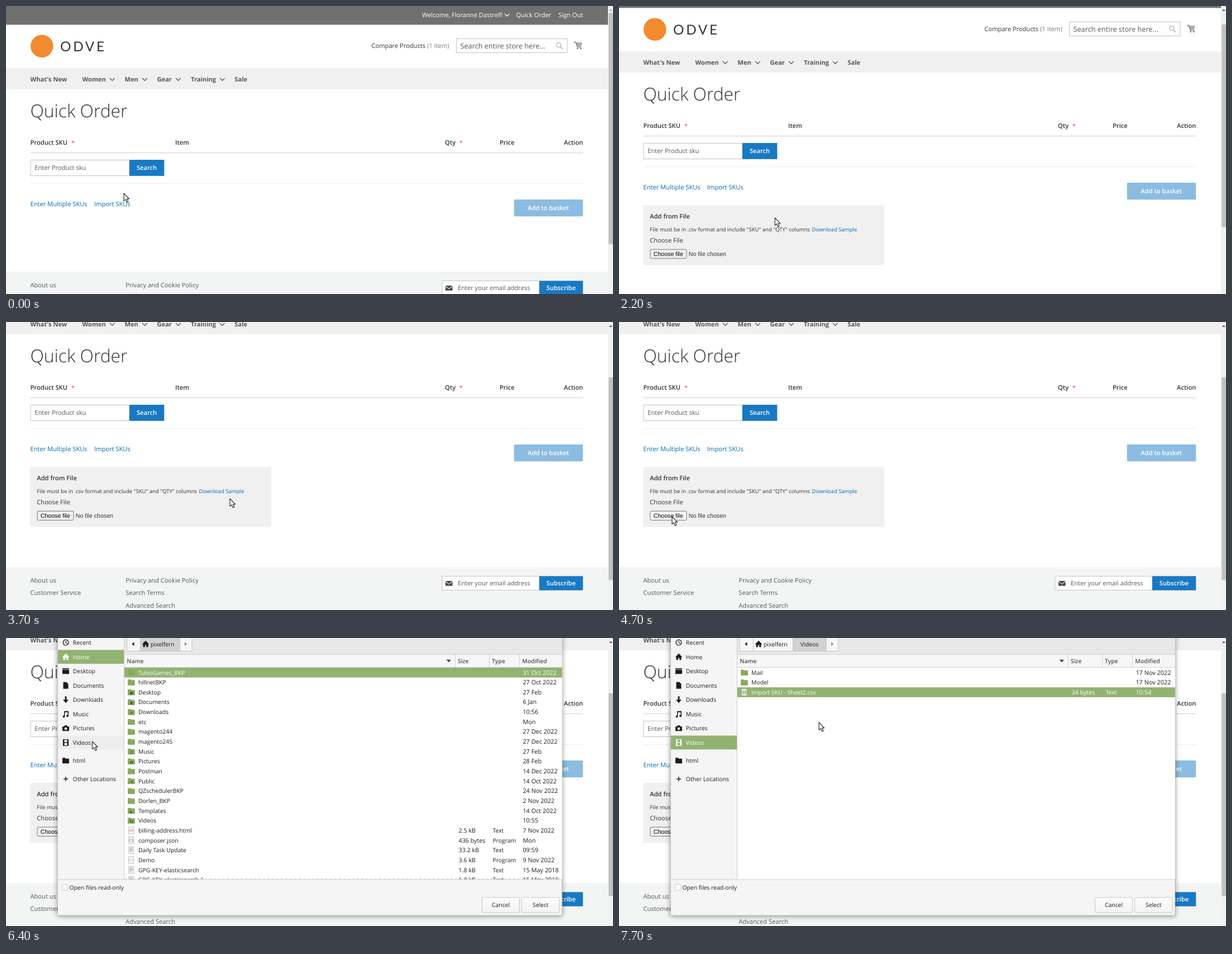
An HTML page for the animation above (8000 ms loop, 1087x515 px).

```html
<!DOCTYPE html>
<html lang="en">
<head>
<meta charset="utf-8">
<title>Quick Order</title>
<style>
html, body { margin: 0; width: 100%; height: 100%; overflow: hidden; background: #fff; }
svg { display: block; width: 100vw; height: 100vh; }
text { font-family: "Open Sans", "Noto Sans", sans-serif; text-rendering: geometricPrecision; white-space: pre; }
.sys { font-family: "Liberation Sans", Arial, sans-serif; }
.brand { font-family: Lato, sans-serif; letter-spacing: 3.7px; }
</style>
</head>
<body>
<svg id="stage" viewBox="0 0 1087 515" preserveAspectRatio="none"></svg>
<script>
const LOOP = 8000, BASE = 11.14;
const INK = '#333', GREY = '#575757', LINK = '#006bb4', BLUE = '#1979c3', GREEN = '#92b372';

const text = (x, y, s, fill = INK, o = {}) =>
  `<text x="${x}" y="${y}" fill="${fill}" font-size="${o.size || BASE}" font-weight="${o.weight || 400}"` +
  ` text-anchor="${o.anchor || 'start'}" class="${o.cls || ''}">${s}</text>`;
const rect = (x, y, w, h, fill, extra = '') =>
  `<rect x="${x}" y="${y}" width="${w}" height="${h}" fill="${fill}" ${extra}/>`;
const path = (d, fill, extra = '') => `<path d="${d}" fill="${fill}" ${extra}/>`;
const line = (d, color, w = 1, extra = '') =>
  path(d, 'none', `stroke="${color}" stroke-width="${w}" ${extra}`);
const group = (id, body, extra = '') => `<g id="${id}" ${extra}>${body}</g>`;
const at = (x, y, body, scale = 1) => `<g transform="translate(${x} ${y}) scale(${scale})">${body}</g>`;
const chevron = (x, y, color) => line(`M${x} ${y - 2}l4.3 4.3 4.3-4.3`, color, 1.3);
const semi = { weight: 600 };
const white = (x, y, s) => text(x, y, s, '#fff', { weight: 600, anchor: 'middle' });

/* ---------- shop page ---------- */
function header() {
  const cart = line('M1017 64.5h3l3.2 8.5h6.8', '#757575', 1.4) +
    line('M1021 66.2h10.5M1021.7 68.3h9.3M1022.4 70.4h8', '#757575', 1.3) +
    '<circle cx="1023.6" cy="75.8" r="1.5" fill="#757575"/><circle cx="1029.4" cy="75.8" r="1.5" fill="#757575"/>';
  return rect(0, 0, 1078, 33.5, '#6e716e') +
    text(889.5, 20, 'Welcome, Floranne Dastrell!', '#fff', { anchor: 'end' }) + chevron(893, 16, '#fff') +
    text(913.5, 20, 'Quick Order', '#fff') + text(1033.5, 20, 'Sign Out', '#fff', { anchor: 'end' }) +
    '<circle cx="64.3" cy="71.8" r="20.3" fill="#f28b2e"/>' +
    text(97, 80.5, 'ODVE', INK, { size: 24.3, cls: 'brand' }) +
    text(654.5, 75, 'Compare Products') + text(754.3, 75, '(1 item)', '#7d7d7d') +
    rect(806.5, 58.5, 198.5, 25, '#fff', 'stroke="#c2c2c2"') +
    text(813.5, 75.6, 'Search entire store here...', GREY, { size: 12.73 }) +
    '<circle cx="989.8" cy="69.8" r="4" fill="none" stroke="#b5b5b5" stroke-width="1.4"/>' +
    line('M992.8 72.8l4 4', '#b5b5b5', 1.8) + cart;
}

function nav() {
  const items = [["What's New", 43.5], ['Women', 136.5, 186], ['Men', 212.5, 244.2],
    ['Gear', 270.5, 304.2], ['Training', 331, 383], ['Sale', 409.3]];
  return rect(0, 111.5, 1078, 37.5, '#f0f0f0') + items.map(([s, x, c]) =>
    text(x, 135, s, GREY, { weight: 700 }) + (c ? chevron(c, 131, GREY) : '')).join('');
}

function order() {
  const star = x => text(x, 248, '*', '#e02b27', { size: 10 });
  return text(43.5, 198.6, 'Quick Order', INK, { size: 31.83, weight: 300 }) +
    text(43.5, 248, 'Product SKU', INK, semi) + star(117.3) + text(303, 248, 'Item', INK, semi) +
    text(786, 248, 'Qty', INK, semi) + star(812) + text(884, 248, 'Price', INK, semi) +
    text(1033.3, 248, 'Action', INK, { weight: 600, anchor: 'end' }) +
    line('M43.5 262.5H1033.5', '#d0d0d0') + line('M43.5 317.5H1033.5', '#ececec') +
    rect(44, 275.5, 177, 28, '#fff', 'stroke="#c2c2c2"') + text(51.3, 293.2, 'Enter Product sku', GREY) +
    rect(221, 275, 62.3, 28.8, BLUE) + white(252, 293.2, 'Search') +
    text(43.5, 358, 'Enter Multiple SKUs', LINK) + text(158, 358, 'Import SKUs', LINK) +
    group('under', line('M158 359.7H223', LINK)) +
    rect(909.7, 346, 123.5, 30.2, '#8cbce1', 'rx="2"') + white(971.3, 365, 'Add to basket');
}

const panel = () => rect(43.5, 386, 431.5, 107.5, '#f0f0f0', 'rx="3"') +
  text(55.3, 409.8, 'Add from File', INK, semi) +
  text(55.3, 432.7, 'File must be in .csv format and include "SKU" and "QTY" columns', INK, { size: 9.55 }) +
  text(345.6, 432.7, 'Download Sample', LINK, { size: 9.55 }) +
  text(55.3, 453, 'Choose File') +
  rect(56, 465.2, 65, 16.2, '#efefef', 'id="pick" rx="2" stroke="#767676"') +
  text(61.8, 477, 'Choose file', '#000', { size: 10.6, cls: 'sys' }) +
  text(124.8, 477, 'No file chosen', INK, { size: 10.6, cls: 'sys' });

const footer = () => rect(0, 0, 1078, 400, '#f3f4f4') +
  ['About us', 'Customer Service'].map((s, i) => text(43.5, 28 + i * 22.3, s, GREY)).join('') +
  ['Privacy and Cookie Policy', 'Search Terms', 'Advanced Search']
    .map((s, i) => text(214.3, 28 + i * 22.3, s, GREY)).join('') +
  rect(781, 16.5, 174, 25, '#fff', 'stroke="#c2c2c2"') +
  path('M787 25h12.6l-6.3 5.2zM787 26.6l6.3 5 6.3-5v7.2H787z', '#474747') +
  text(809, 33, 'Enter your email address', GREY) +
  rect(955, 16.4, 78.2, 25.4, BLUE) + white(994, 33, 'Subscribe');

/* ---------- file dialog ---------- */
const D = 10.4, DARK = '#1c1c1c';
const icon = {
  recent: 'M0-5.5a5.5 5.5 0 1 0 .01 0ZM0-4.2a4.2 4.2 0 1 1-.01 0ZM-.6-3H.6V-.2L3 1.4 2.3 2.3-.6.5Z',
  home: 'M-6.5.5L0-6 6.5.5H4.5V5.5H1.2V2H-1.2V5.5H-4.5V.5Z',
  desk: 'M-6-5H6V-3H-6ZM-6-2.2H6V5H-6Z',
  doc: 'M-4.5-6H1L4.5-2.5V6H-4.5Z',
  down: 'M-1.4-6H1.4V0H5L0 6-5 0H-1.4Z',
  music: 'M-3-5H5V3.5a2 1.8 0 1 1-1.5-1.7V-3H-1.5V4.5a2 1.8 0 1 1-1.5-1.7Z',
  cam: 'M-6-3H-3L-2-5H2L3-3H6V5H-6ZM0-1.5a2.4 2.4 0 1 0 .01 0Z',
  film: 'M-5-6H5V6H-5ZM-2.5-5V-.6H2.5V-5ZM-2.5.6V5H2.5V.6Z',
  dir: 'M-6-5H-1L0-3.5H6V5H-6Z',
  plus: 'M-.7-4H.7V-.7H4V.7H.7V4H-.7V.7H-4V-.7H-.7Z',
  share: 'M-5 0L4-5V5Z',
  page: 'M-6 6V-4L6 6Z'
};
const glyph = (name, fill) => path(icon[name], fill, 'fill-rule="evenodd"');

const places = [['Recent', 8, 'recent'], ['Home', 33.7, 'home'], ['Desktop', 59.2, 'desk'],
  ['Documents', 84.8, 'doc'], ['Downloads', 110.3, 'down'], ['Music', 135.8, 'music'],
  ['Pictures', 161.2, 'cam'], ['Videos', 186.9, 'film'], ['html', 219.2, 'dir'], ['Other Locations', 252, 'plus']];

const sidebar = () => places.map(([s, y, g], i) =>
  `<g id="place${i}">` + rect(93, y - 12.4, 118, 24.8, 'none') +
  at(107, y, glyph(g, 'currentColor')) + text(119.8, y + 3.8, s, 'currentColor', { size: D }) + '</g>').join('');

function listIcon(kind, y) {
  const sheet = rect(-4.5, -6, 9, 12, '#fafafa', 'stroke="#a8a8a8" stroke-width=".8"');
  const marks = {
    text: line('M-3-3.5H2M-3-1.5H3M-3 .5H3M-3 2.5H1', '#8f8f8f', .9),
    web: line('M-1.3-2L-3 0l1.7 2M1.3-2L3 0 1.3 2M.6-2.8L-.6 2.8', '#d98a5a', .9),
    json: line('M-1-2.5H-2.5V2.5H-1M1-2.5H2.5V2.5H1', '#7da046', 1),
    code: line('M-1.3-2L-3 0l1.7 2M1.3-2L3 0 1.3 2', '#a9a9a9', .9),
    csv: rect(-3, -3, 6, 6.5, '#7fa65a') + line('M-3-.8H3M-3 1.4H3M0-3V3.5', '#fff', .7)
  };
  if (marks[kind]) return at(224.3, y, sheet + marks[kind]);
  return at(224.4, y, path('M-6-5H-1.5L-.5-4H6V5H-6Z', '#78994f') +
    rect(-6.4, -2.8, 12.8, 8.2, '#87ab5b', 'rx=".8"') + line('M-6-2.6H6', '#a9c487', .6) +
    (kind ? at(.3, 1.5, glyph(kind, '#456324'), .45) : ''));
}

const rowY = i => 61.7 + 17.65 * i;
function row(s, i, picked) {
  const [name, size, type, date, kind] = s.split('|');
  const color = picked ? '#fff' : DARK, y = rowY(i) + 3.8;
  const cell = (x, v, fs) => v ? text(x, y, v, color, { size: fs }) : '';
  return (picked ? rect(211.5, rowY(i) - 8.8, 784.5, 17.7, GREEN) : '') + listIcon(kind, rowY(i)) +
    cell(237, name, D) + cell(810.6, size, 10.7) + cell(871.5, type, D) + cell(925.4, date, 10.9);
}
const rows = (list, sel) => list.map((s, i) => row(s, i, i === sel)).join('');

const homeRows = ['TulvoGames_BKP|||31 Oct 2022|', 'hillnetBKP|||27 Oct 2022|', 'Desktop|||27 Feb|desk',
  'Documents|||6 Jan|doc', 'Downloads|||10:56|down', 'etc|||Mon|', 'magento244|||27 Dec 2022|',
  'magento245|||27 Dec 2022|', 'Music|||27 Feb|music', 'Pictures|||28 Feb|cam', 'Postman|||14 Dec 2022|',
  'Public|||14 Oct 2022|share', 'QZschedulerBKP|||24 Nov 2022|', 'Dorlen_BKP|||2 Nov 2022|',
  'Templates|||14 Oct 2022|page', 'Videos|||10:55|film', 'billing-address.html|2.5 kB|Text|7 Nov 2022|web',
  'composer.json|436 bytes|Program|Mon|json', 'Daily Task Update|33.2 kB|Text|09:59|text',
  'Demo|3.6 kB|Program|9 Nov 2022|code', 'GPG-KEY-elasticsearch|1.8 kB|Text|15 May 2018|text',
  'GPG-KEY-elasticsearch.1|1.8 kB|Text|15 May 2018|text'];
const videoRows = ['Mail|||17 Nov 2022|', 'Model|||17 Nov 2022|', 'Import SKU - Sheet2.csv|34 bytes|Text|10:54|csv'];

function crumbs(inVideos) {
  const end = inVideos ? 371 : 311;
  const edge = '#c4c4c4';
  return rect(216.5, -6, end + 22 - 216.5, 29.5, '#f6f6f6', `rx="2" stroke="${edge}"`) +
    rect(inVideos ? 311 : 240, 0, inVideos ? 60 : 71, 23, '#d2d2d2') +
    line(`M240.5 0V23M311.5 0V23M${end + .5} 0V23`, edge) +
    path('M229.5 7.2v7L225.3 10.7z', DARK) + path(`M${end + 9} 7.2v7l4.2-3.5z`, '#8e8e8e') +
    at(250, 10.8, glyph('home', DARK)) + text(259, 14.6, 'pixelfern', DARK, { size: D }) +
    (inVideos ? text(341, 14.6, 'Videos', DARK, { size: D, anchor: 'middle' }) : '');
}

const button = (x, w, s) => rect(x, 464, w, 27, 'url(#btn)', 'rx="2" stroke="#c6c6c6"') +
  text(x + w / 2, 481.4, s, DARK, { size: D, anchor: 'middle' });

function dialog() {
  const head = (x, s) => text(x, 44.8, s, '#505050', { size: D, weight: 600 });
  return rect(92, -40, 904, 537.5, '#000', 'filter="url(#blur)" opacity=".42"') +
    rect(92.4, -5, 903.4, 501, '#f5f5f5', 'stroke="#bcbcbc" stroke-width=".8"') +
    rect(211, 0, 784.8, 29, '#e8e8e8') + sidebar() +
    rect(211.5, 29, 784.3, 24, '#f6f6f6') + rect(211.5, 53, 784.3, 379, '#fff') +
    line('M211.5 29.5H996M211.5 52.5H996M804.5 30V52M865.5 30V52M919.5 30V52', '#d2d2d2') +
    head(216.3, 'Name') + head(809, 'Size') + head(870, 'Type') + head(924.3, 'Modified') +
    path('M788.5 38.8h8.6l-4.3 4.8z', '#444') +
    '<g clip-path="url(#list)">' +
    group('home', rows(homeRows, 0) + line('M212 430.8H996', '#c9c9c9', 1, 'stroke-dasharray="4 4"')) +
    group('vidA', rows(videoRows, 0)) + group('vidB', rows(videoRows, 2)) + '</g>' +
    group('crumbHome', crumbs(false)) + group('crumbVid', crumbs(true)) +
    line('M211.5 0V432M93 432H996', '#cdcdcd') +
    rect(100.5, 440.8, 10.2, 10.2, '#fff', 'rx="1.5" stroke="#c4c4c4"') +
    text(113.4, 449.7, 'Open files read-only', DARK, { size: D }) +
    button(852.5, 67, 'Cancel') + button(923.5, 67.5, 'Select');
}

const arrow = path('M0 0V13.6L3.1 10.8 5.5 15.9 7.9 14.9 5.6 9.9H9.6Z', '#fff',
  'stroke="#222" stroke-width="1.1" stroke-linejoin="round"');
const hand = path('M-1.3 7.5V1a1.3 1.3 0 0 1 2.6 0V4.6l4.2.8q1.7.4 1.7 2V9.6q0 1.5-1 3.2H-1.3L-4 9q-.7-1.8 1-1.8Z',
  '#fff', 'stroke="#222" stroke-width="1.1" stroke-linejoin="round"') +
  line('M1.3 4.6V7M3.3 5.2V7.2M5.2 5.6V7.4', '#222', .8);

document.getElementById('stage').innerHTML =
  `<defs><filter id="blur" x="-5%" y="-8%" width="110%" height="116%"><feGaussianBlur stdDeviation="5"/></filter>
  <clipPath id="list">${rect(211.5, 53, 784.3, 379, '#fff')}</clipPath>
  <linearGradient id="btn" x2="0" y2="1"><stop stop-color="#fdfdfd"/><stop offset="1" stop-color="#f3f3f3"/></linearGradient></defs>` +
  rect(0, 0, 1087, 515, '#fff') +
  group('page', header() + nav() + order() + group('panel', panel()) + group('foot', footer())) +
  rect(1078, 0, 9, 515, '#f1f1f1') + rect(1079.2, 12.5, 7.8, 362, '#c1c1c1', 'id="thumb"') +
  path('M1080 8.8l3-3.4 3 3.4z', '#a3a3a3', 'id="up"') +
  group('dialog', dialog()) + group('arrow', arrow) + group('hand', hand);

/* ---------- motion ---------- */
const el = {};
document.querySelectorAll('[id]').forEach(e => { el[e.id] = e; });
const show = (id, on) => { el[id].style.display = on ? '' : 'none'; };
const set = (e, name, v) => e.setAttribute(name, v);
const move = (id, x, y) => set(el[id], 'transform', `translate(${x} ${y})`);

const pointer = [[0, 211, 335], [200, 207, 330], [600, 193, 371], [900, 182, 356], [1000, 182, 356],
  [1100, 184, 354.5], [1900, 184, 354.5], [2400, 331, 392], [2900, 331, 392], [3700, 401, 316],
  [3800, 413, 317], [4400, 95, 348], [4900, 95, 348], [5400, 124, 174], [5500, 124, 174],
  [5600, 140, 157], [5700, 140, 157], [6100, 160, 107], [6200, 160, 107], [6400, 154.5, 185],
  [6600, 154.5, 185], [7300, 345, 92], [7400, 345, 92], [7700, 358, 151]];
const scrolling = [[0, 0], [2000, 0], [2400, 60], [3000, 60], [3700, 127]];

function sample(keys, t) {
  const i = keys.findIndex(k => k[0] > t);
  if (i < 0) return keys[keys.length - 1].slice(1);
  const a = keys[i - 1], b = keys[i];
  const p = (t - a[0]) / (b[0] - a[0]), e = p * p * (3 - 2 * p);
  return a.slice(1).map((v, j) => v + (b[j + 1] - v) * e);
}

function draw(ms) {
  const t = Math.floor((ms % LOOP) / 100) * 100;   // screen refreshes ten times a second
  const [x, y] = sample(pointer, t);
  const scroll = Math.round(sample(scrolling, t)[0]);
  const open = t >= 1300, modal = t >= 4900, inVideos = t >= 6700, chosen = t >= 7500;

  move('page', 0, -scroll);
  move('foot', 0, open ? 565 : 475);
  show('panel', open);
  set(el.thumb, 'y', 12.5 + scroll * .68);
  set(el.thumb, 'height', open ? 362.5 : 413.5);
  set(el.up, 'fill', scroll ? '#505050' : '#a3a3a3');

  const docY = y + scroll;
  const onLink = !modal && x > 158 && x < 223 && docY > 347 && docY < 362;
  const onPick = open && x > 56 && x < 121 && docY > 465 && docY < 482;
  const pressed = t >= 4700 && !modal;
  show('under', onLink);
  set(el.pick, 'fill', onPick && !modal ? (pressed ? '#f5f5f5' : '#e5e5e5') : '#efefef');
  set(el.pick, 'stroke', onPick && !pressed && !modal ? '#4f4f4f' : '#767676');

  show('dialog', modal);
  show('home', !inVideos);
  show('crumbHome', !inVideos);
  show('crumbVid', inVideos);
  show('vidA', inVideos && !chosen);
  show('vidB', chosen);
  places.forEach(([, py], i) => {
    const g = el['place' + i], on = i === (inVideos ? 7 : 1);
    const over = x > 93 && x < 211 && Math.abs(y - py) < 12.7;
    g.style.color = on ? '#fff' : DARK;
    set(g.firstChild, 'fill', on ? GREEN : over ? '#ededed' : 'none');
  });

  show('arrow', !onLink);
  show('hand', onLink);
  move('arrow', x, y);
  move('hand', x, y);
}

const start = performance.now();
function tick() {
  draw(performance.now() - start);
  requestAnimationFrame(tick);
}
draw(0);
tick();
</script>
</body>
</html>
```
